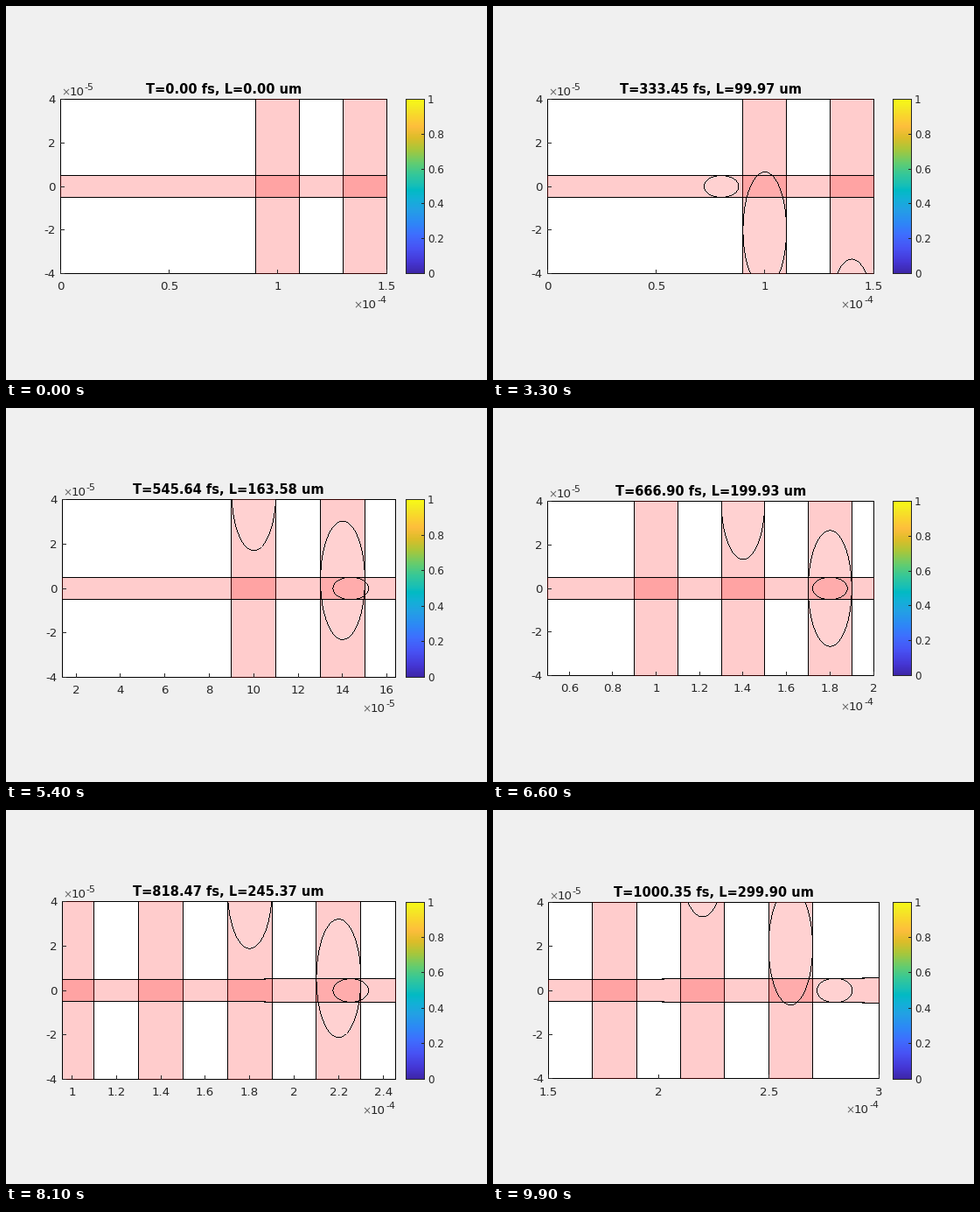
A matplotlib script for the animation above (10 s loop, 550x427 px).

```python
import numpy as np
import matplotlib.pyplot as plt
from matplotlib.animation import FuncAnimation
from matplotlib.colors import LinearSegmentedColormap
from matplotlib.patches import PathPatch
from matplotlib.path import Path

W, H, DPI = 550, 427, 64
PX = 72 / DPI                       # one pixel in points
N = 100
DT, C = 10.10451, 0.299792458       # fs per step, um per fs
SPAN, Y_MID, Y_MAX = 150, 206, 40   # window length (um), mid row, half height (um)
COLUMNS = range(100, 261, 40)
INK = (0.15, 0.15, 0.15)

STOPS = [
    (0, (0.242, 0.150, 0.660)), (4, (0.271, 0.215, 0.836)),
    (9, (0.281, 0.323, 0.958)), (14, (0.244, 0.436, 0.999)),
    (18, (0.179, 0.529, 0.968)), (23, (0.138, 0.628, 0.897)),
    (27, (0.069, 0.695, 0.839)), (30, (0.007, 0.731, 0.766)),
    (32, (0.096, 0.750, 0.712)), (36, (0.216, 0.784, 0.592)),
    (40, (0.391, 0.803, 0.435)), (45, (0.672, 0.779, 0.223)),
    (49, (0.863, 0.741, 0.160)), (53, (0.996, 0.743, 0.237)),
    (57, (0.979, 0.839, 0.177)), (60, (0.960, 0.914, 0.142)),
    (63, (0.977, 0.984, 0.081))]
PARULA = LinearSegmentedColormap.from_list(
    "parula_like", [(k / 63, rgb) for k, rgb in STOPS])
RAMP = np.linspace(0, 1, 256)[:, None]
ANGLE = np.linspace(0, 2 * np.pi, 121)

plt.rcParams["font.family"] = "DejaVu Sans"
fig = plt.figure(figsize=(W / DPI, H / DPI), dpi=DPI, facecolor=(240 / 255,) * 3)
ax = fig.add_axes([0, 0, 1, 1])


def snap(v):
    return np.floor(v) + 0.5


def line(x, y, color="black", z=2):
    ax.plot(x, y, color=color, lw=PX, antialiased=False, snap=False,
            solid_capstyle="butt", zorder=z)


def fill(x, y, color, alpha=1.0, z=1):
    ax.fill(x, y, color=color, alpha=alpha, lw=0, antialiased=False,
            snap=False, zorder=z)


def label(x, y, s, size=13.33, **kw):
    ax.text(x, y, s, fontsize=size * PX, va="baseline", **{"color": INK, **kw})


def box(x0, x1, y0, y1, color="black", z=2):
    line([x0, x1, x1, x0, x0], [y0, y0, y1, y1, y0], color, z)


def power(x, y, exponent):
    label(x + 1, y, "×", 12, color="0.4")
    label(x + 10.5, y, "10")
    label(x + 27.5, y - 6, str(exponent), 11)


def ellipse_pixels(cx, cy, rx, ry):
    """Pixel centres of a one-pixel outline: per column where flat, per row where steep."""
    def arc(c, d, r, q):
        reach = r * r / np.hypot(r, q)
        u = np.arange(np.ceil(c - reach - 0.5), c + reach - 0.5) + 0.5
        v = q * np.sqrt(1 - ((u - c) / r) ** 2)
        return np.r_[u, u], snap(np.r_[d - v, d + v])

    x0, y0 = arc(cx, cy, rx, ry)
    y1, x1 = arc(cy, cx, ry, rx)
    return np.r_[x0, x1], np.r_[y0, y1]


def waist(x):
    return 5 * np.sqrt(1 + ((x - 100) / 397) ** 2)


def ticks_for(n, lo, hi):
    step = 50 if n < 50 or n == N - 1 else 20
    first = np.ceil(lo / step - 1e-6) * step + 0
    ticks = np.arange(first, hi + 1e-6, step)
    exponent = -5 if n >= 50 and lo + hi < 200 else -4
    return ticks, exponent


def draw_colorbar(half):
    x0, x1 = 457.5, 478.5
    top, bottom = snap(Y_MID - half), snap(Y_MID + half)
    ax.imshow(RAMP, cmap=PARULA, origin="lower", aspect="auto",
              extent=(x0, x1, bottom, top), interpolation="nearest")
    box(x0, x1, top, bottom, INK)
    for v in np.arange(6) / 5:
        y = snap(Y_MID + half * (1 - 2 * v))
        line([x1 - 3, x1], [y, y], INK)
        label(482, round(y + 4.2), f"{v:g}", 12)


def update(n):
    ax.clear()
    front = 300 * n / (N - 1)
    hi = max(SPAN, front)
    lo = hi - SPAN
    ticks, exponent = ticks_for(n, lo, hi)

    # the plot box shrinks when the last tick label hangs over its right edge
    half_label = 4 if n == N - 1 else 8 if exponent == -5 else 10
    over = max(0, half_label - (hi - ticks[-1]) * 2.52)
    left, right = 64 - 0.17 * over, 445.02 - over
    scale = (right - left) / SPAN
    half = Y_MAX * scale
    l, r = snap(left), snap(right)
    t, b = snap(Y_MID - half), snap(Y_MID + half)

    def raw(x):
        return left + (x - lo) * scale

    def px(x):
        return np.clip(raw(x), l, r)

    def py(y):
        return np.clip(Y_MID - y * scale, t, b)

    # plot box, below the translucent beams
    fill([l, r, r, l], [t, t, b, b], "white", z=0.5)
    box(l, r, t, b, z=0.6)

    # vertical beams
    for xc in COLUMNS:
        if xc + 10 <= lo or xc - 10 >= hi:
            continue
        x0, x1 = snap(px(xc - 10)), snap(px(xc + 10))
        fill([x0, x1, x1, x0], [t, t, b, b], "red", 0.2)
        for x in (x0, x1):
            line([x, x], [t, b], z=1.1)

    # horizontal beam, slowly diverging
    x = np.linspace(lo, hi, 380)
    upper, lower = snap(py(waist(x))), snap(py(-waist(x)))
    xs = px(x)
    fill(np.r_[xs, xs[::-1]], np.r_[upper, lower[::-1]], "red", 0.2, z=1.2)
    line(xs, upper)
    line(xs, lower)

    # pulses: one shared white veil, separate outlines
    centre = front - 20
    pulses = [(xc, centre - xc, 10, 26.6) for xc in COLUMNS]
    pulses.append((centre, 0, 8, waist(centre)))
    veil = []
    for x, y, rx, ry in pulses:
        if x + rx <= lo or x - rx >= hi or abs(y) - ry >= Y_MAX:
            continue
        veil.append(Path(np.c_[px(x + rx * np.cos(ANGLE)),
                               py(y + ry * np.sin(ANGLE))], closed=True))
        u, v = ellipse_pixels(raw(x), Y_MID - y * scale, rx * scale, ry * scale)
        inside = (u >= l) & (u <= r) & (v >= t) & (v <= b)
        u, v = u[inside], v[inside]
        ax.hlines(v, u - 0.5, u + 0.5, color="black", lw=PX, snap=False)
    if veil:
        ax.add_patch(PathPatch(Path.make_compound_path(*veil), color="white",
                               alpha=0.1, lw=0, antialiased=False, zorder=1.3))

    # ticks and labels
    for v in ticks:
        x = snap(px(v))
        line([x, x], [b - 4, b], INK)
        label(x, round(b + 19), f"{v / 10 ** (exponent + 6):g}", ha="center")
    for v in range(-4, 5, 2):
        y = snap(py(10 * v))
        line([l, l + 4], [y, y], INK)
        label(l - 5.5, round(y + 4.6), str(v), ha="right")
    power(l - 0.5, round(t - 4), -5)
    power(r - 39, round(b + 39.5), exponent)

    time = DT * n
    label((left + right) / 2, round(t - 6.5),
          f"T={time:.2f} fs, L={C * time:.2f} um", 14.67,
          color="black", weight="bold", ha="center")
    draw_colorbar(101 if n >= 80 else half)

    ax.set_xlim(0, W)
    ax.set_ylim(H, 0)
    ax.axis("off")
    return []


anim = FuncAnimation(fig, update, frames=N, init_func=lambda: [],
                     interval=100, repeat=True, repeat_delay=0, blit=False)
plt.show()
```
